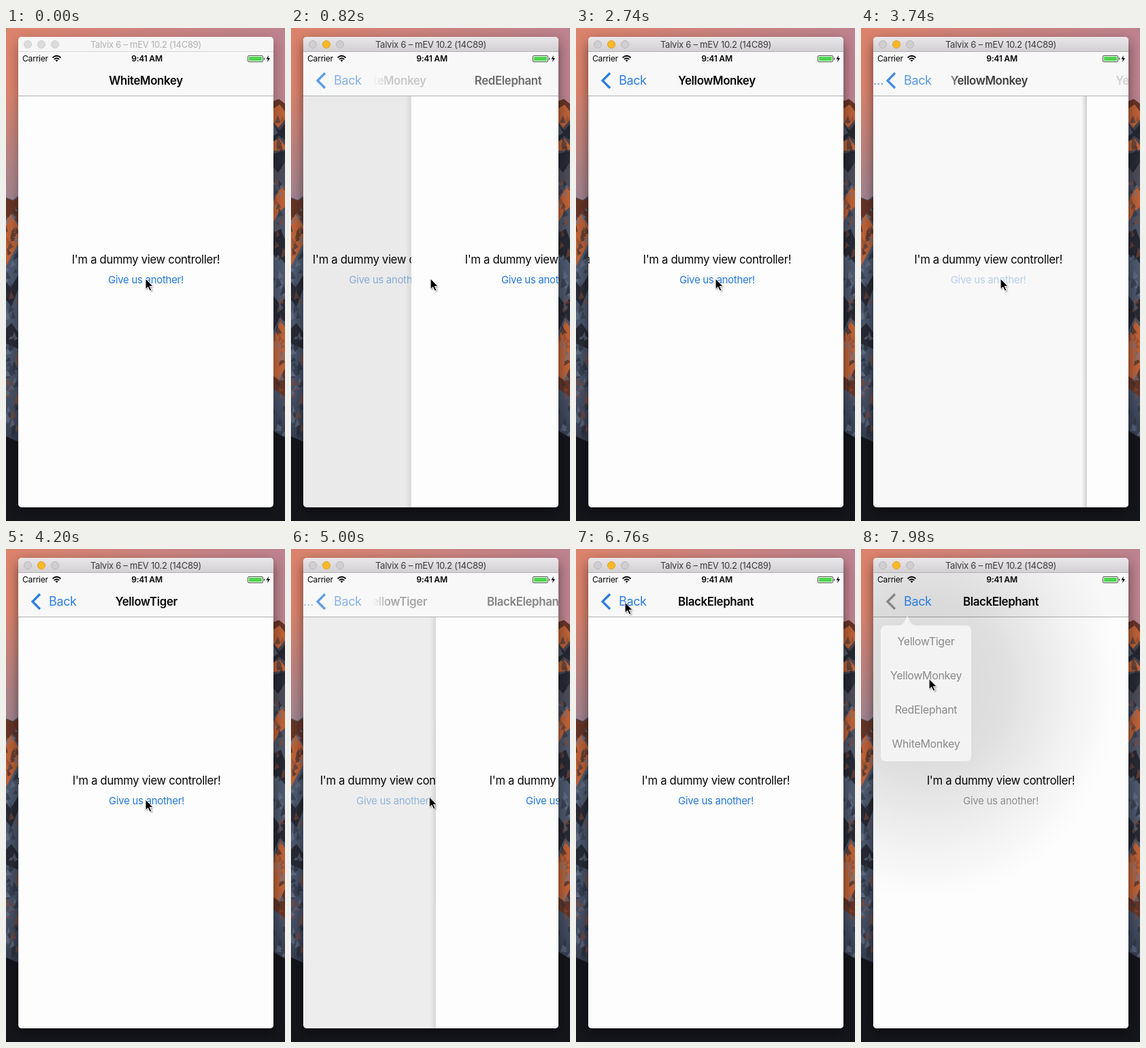
An HTML page that plays this animation: 410 by 722 pixels, repeating every 8 s.

```html
<!DOCTYPE html>
<html lang="en">
<head>
<meta charset="utf-8">
<title>Navigation demo</title>
<style>
html, body { margin: 0; width: 100%; height: 100%; overflow: hidden; background: #15161c; }
svg { display: block; width: 410px; height: 722px; }
text { font-family: Inter, "Open Sans", sans-serif; letter-spacing: -.02em; fill: #060606; }
.mid { text-anchor: middle; }
.label { font-size: 16.7px; }
.link { font-size: 15px; fill: #2479d8; }
.heading { font-size: 16.8px; font-weight: 600; }
.back { font-size: 18px; fill: #2b7de0; }
.status { font-size: 12.1px; }
.row { font-size: 16px; fill: #8a8a8a; }
</style>
</head>
<body>
<svg viewBox="0 0 410 722">
  <defs>
    <linearGradient id="sky">
      <stop stop-color="#dc836c"/><stop offset="1" stop-color="#bd838f"/>
    </linearGradient>
    <linearGradient id="haze" x2="0" y2="1">
      <stop offset=".35" stop-color="#94849a" stop-opacity="0"/><stop offset="1" stop-color="#94849a" stop-opacity=".85"/>
    </linearGradient>
    <linearGradient id="slope" x2="0" y2="1">
      <stop stop-color="#4a3d42"/><stop offset=".35" stop-color="#4f5b70"/><stop offset=".7" stop-color="#465168"/><stop offset="1" stop-color="#191b22"/>
    </linearGradient>
    <linearGradient id="chrome" x2="0" y2="1">
      <stop stop-color="#e9e7e9"/><stop offset="1" stop-color="#d1cfd1"/>
    </linearGradient>
    <linearGradient id="edge">
      <stop stop-opacity="0"/><stop offset="1" stop-opacity=".2"/>
    </linearGradient>
    <linearGradient id="fade" gradientUnits="userSpaceOnUse" x1="120" x2="144">
      <stop stop-color="#000"/><stop offset="1" stop-color="#fff"/>
    </linearGradient>
    <radialGradient id="glow">
      <stop stop-opacity=".15"/><stop offset=".4" stop-opacity=".12"/>
      <stop offset=".75" stop-opacity=".045"/><stop offset="1" stop-opacity="0"/>
    </radialGradient>
    <filter id="blur" x="-20%" y="-20%" width="140%" height="140%"><feGaussianBlur stdDeviation="9"/></filter>
    <filter id="soft" x="-50%" y="-50%" width="200%" height="200%"><feGaussianBlur stdDeviation="1"/></filter>
    <clipPath id="window"><rect x="18" y="13" width="375" height="689" rx="5"/></clipPath>
    <clipPath id="content"><rect x="18" y="100" width="375" height="602"/></clipPath>
    <clipPath id="oldClip"><rect id="oldArea" x="18" y="100" width="375" height="602"/></clipPath>
    <mask id="titleMask" maskUnits="userSpaceOnUse" x="0" y="36" width="410" height="63">
      <rect y="36" width="410" height="63" fill="url(#fade)"/>
    </mask>
  </defs>

  <!-- wallpaper -->
  <rect width="410" height="260" fill="url(#sky)"/>
  <rect width="410" height="260" fill="url(#haze)"/>
  <path d="M0 248L10 252 18 246H200L393 108 400 106 410 112V722H0z" fill="url(#slope)"/>
  <g fill="#bd6238">
    <path d="M0 282L7 272 18 290V316L9 332 0 349z"/>
    <path d="M393 112L402 108 410 122V134L400 146 393 138z"/>
    <path d="M393 166L402 162 410 172V178L393 180z"/>
    <path d="M393 254L401 238 410 232V262L401 270 393 284z"/>
    <path d="M393 456L403 428 410 438V498L401 516 393 510z"/>
  </g>
  <g fill="#653527">
    <path d="M0 249L10 253 18 249V286L9 270 0 282z"/>
    <path d="M393 107L401 104 410 111V122L402 112 393 118z"/>
    <path d="M393 510L402 516 410 498V540L393 528z"/>
  </g>
  <g fill="#272a35">
    <path d="M393 142L402 150 410 140V164L401 158 393 166z"/>
    <path d="M393 184L410 180V196L400 212 393 204z"/>
    <path d="M393 300L404 294 410 310V345L400 332 393 340z"/>
    <path d="M0 372L7 380 18 362V382L8 408 0 398z"/>
    <path d="M0 440L8 432 18 446V470L0 462z"/>
    <path d="M393 392L402 404 410 396V430L402 424 393 444z"/>
  </g>
  <g id="rocks" opacity=".55"></g>
  <path d="M0 598L18 606V690H393V590L410 600V722H0z" fill="#15161c"/>

  <!-- window -->
  <rect id="shadow" x="18" y="20" width="375" height="688" rx="6" filter="url(#blur)"/>
  <g clip-path="url(#window)">
    <rect x="18" y="13" width="375" height="689" fill="#fdfdfd"/>

    <g id="oldView" clip-path="url(#oldClip)">
      <g id="oldText">
        <text class="label mid" x="205.5" y="344.5">I'm a dummy view controller!</text>
        <text id="oldLink" class="link mid" x="205.5" y="374">Give us another!</text>
      </g>
      <rect id="dim" x="18" y="100" width="375" height="602"/>
      <rect id="edgeShade" y="100" width="8" height="602" fill="url(#edge)"/>
    </g>
    <g clip-path="url(#content)">
      <g id="newView">
        <rect x="18" y="100" width="375" height="602" fill="#fdfdfd"/>
        <text class="label mid" x="205.5" y="344.5">I'm a dummy view controller!</text>
        <text id="newLink" class="link mid" x="205.5" y="374">Give us another!</text>
      </g>
    </g>

    <rect x="18" y="35" width="375" height="64" fill="#f8f8f8"/>
    <rect x="18" y="99" width="375" height="1" fill="#b0b0b0"/>
    <ellipse id="halo" cx="95" cy="200" rx="285" ry="315" fill="url(#glow)"/>
    <g mask="url(#titleMask)"><text id="oldTitle" class="heading mid" y="83"></text></g>
    <text id="newTitle" class="heading mid" y="83"></text>
    <text id="dots" class="back" x="18" y="83">…</text>
    <path id="chevron" d="M50 66L39 77 50 88" fill="none" stroke-width="3.2"/>
    <text id="back" class="back" x="63" y="83">Back</text>

    <text class="status" x="24" y="49">Carrier</text>
    <text class="status mid" x="207" y="49" style="font-weight:600">9:41 AM</text>
    <g fill="none" stroke="#060606" stroke-width="1.8">
      <path d="M68.500 43.500Q74.500 38 80.500 43.500M70.800 45.900Q74.500 42.500 78.200 45.900"/>
    </g>
    <path d="M72.500 47.300Q74.500 45.600 76.500 47.300L74.500 49.500z"/>
    <rect x="355.500" y="40.500" width="22" height="9" rx="1.500" fill="#fdfdfd" stroke="#4a554a"/>
    <rect x="357" y="42" width="19" height="6" fill="#4fd64f"/>
    <path d="M379 43Q381 45 379 47z"/>
    <path d="M386 40L382.500 45.500H385L384 50 388 44H385.300z"/>

    <rect id="titleBar" x="18" y="13" width="375" height="22"/>
    <path id="barLine" d="M18 34.500H393"/>
    <g id="lights" stroke-width="1">
      <circle cx="32" cy="24" r="5.500"/><circle id="middle" cx="52" cy="24" r="5.500"/><circle cx="72" cy="24" r="5.500"/>
    </g>
    <path id="minus" d="M48.500 24H55.500" stroke="#8a5a00" stroke-width="1.500"/>
    <text id="caption" class="mid" x="205.500" y="28.700" font-size="13">Talvix 6 – mEV 10.2 (14C89)</text>

    <g id="popover">
      <path d="M37 112H57Q62 112 68 98 74 112 79 112H154Q162 112 162 120V303Q162 311 154 311H37Q29 311 29 303V120Q29 112 37 112z" fill="#f3f3f3"/>
      <g id="rows"></g>
    </g>
  </g>

  <g id="cursor">
    <path d="M1 2V17L5 13.500 8 19.500 10.500 18.500 8 12.500H12.500z" opacity=".4" filter="url(#soft)"/>
    <path d="M0 0V15.500L3.600 12.200 6.300 18 8.800 16.900 6.200 11.300H11z" stroke="#fff" stroke-width="1"/>
  </g>
</svg>
<script>
const LOOP = 8000;
const pages = ["WhiteMonkey", "RedElephant", "YellowMonkey", "YellowTiger", "BlackElephant"];
const pushes = [700, 2275, 3696, 4900];
const PRESS = 110, ACTIVATE = 560, POPOVER = 6850;
const CENTER = 205.5, WIDTH = 375;
// time, x, y of the pointer tip
const pointer = [
  [0, 205, 367], [4970, 205, 367], [5450, 50, 22], [5650, 50, 22],
  [6100, 72, 78], [7150, 72, 78], [7700, 100, 190], [8000, 100, 190]
];

const $ = id => document.getElementById(id);
const clamp = v => Math.max(0, Math.min(1, v));
const smooth = v => v * v * (3 - 2 * v);
const set = (id, attrs) => {
  for (const name in attrs) $(id).setAttribute(name, attrs[name]);
};
const show = (id, opacity) => set(id, { opacity: clamp(opacity) });

$("rows").innerHTML = pages.slice(0, 4).reverse()
  .map((name, i) => `<text class="row mid" x="95.5" y="${141 + i * 50}">${name}</text>`).join("");

// small random facets that roughen both mountain sides
function scatterRocks() {
  let seed = 7;
  const random = n => (seed = seed * 16807 % 2147483647) / 2147483647 * n;
  const tones = ["#20232d", "#2d323f", "#6f7a90", "#8a4a34"];
  let rocks = "";
  for (let i = 0; i < 150; i++) {
    const left = i % 2;
    const x = (left ? 0 : 393) + random(17), y = (left ? 262 : 122) + random(left ? 330 : 470);
    const tone = tones[Math.floor(random(tones.length))];
    rocks += `<path d="M${x} ${y}l${2 + random(5)} ${4 + random(9)} ${-4 - random(6)} ${random(6)}z" fill="${tone}"/>`;
  }
  $("rocks").innerHTML = rocks;
}
scatterRocks();

// critically damped spring
function spring(ms) {
  if (ms <= 0) return 0;
  if (ms > 600) return 1;
  const k = ms * .016;
  return 1 - (1 + k) * Math.exp(-k);
}

function pointerAt(t) {
  const i = Math.max(1, pointer.findIndex(p => t <= p[0]));
  const [t0, x0, y0] = pointer[i - 1], [t1, x1, y1] = pointer[i];
  const f = smooth((t - t0) / (t1 - t0));
  return [x0 + (x1 - x0) * f, y0 + (y1 - y0) * f];
}

function drawPush(t) {
  let step = 0;
  while (step < 3 && t >= pushes[step + 1] - PRESS) step++;
  const since = t - pushes[step], p = spring(since), q = 1 - p;
  const edge = 18 + WIDTH * q;

  set("oldArea", { width: WIDTH * q });
  set("oldText", { transform: `translate(${-WIDTH * .3 * p})` });
  set("newView", { transform: `translate(${WIDTH * q})` });
  show("dim", .13 * p);
  set("edgeShade", { x: edge - 8 });
  show("edgeShade", since > 0 ? q : 0);
  show("oldLink", since < -PRESS ? 1 : .2 + .8 * clamp(since / 320));

  $("oldTitle").textContent = pages[step];
  $("newTitle").textContent = pages[step + 1];
  set("oldTitle", { x: CENTER - 106 * p });
  set("newTitle", { x: CENTER + 252 * q + 7 * Math.sin(Math.PI * q) });
  show("oldTitle", 1 - 1.4 * p);
  show("newTitle", p);

  const back = step ? 1 - .45 * Math.sin(Math.PI * p) : p;
  show("back", back);
  show("chevron", Math.sqrt(back));
  show("dots", step && p > .1 ? .9 * q : 0);
}

function drawWindow(t) {
  const active = t >= ACTIVATE;
  set("titleBar", { fill: active ? "url(#chrome)" : "#f6f6f6" });
  set("barLine", { stroke: active ? "#b2b0b2" : "#d8d8d8" });
  set("lights", { fill: active ? "#d0ced0" : "#dcdcdc", stroke: active ? "#b8b6b8" : "#cecece" });
  set("middle", { fill: active ? "#fdb924" : "#dcdcdc", stroke: active ? "#dc9e2a" : "#cecece" });
  $("caption").style.fill = active ? "#3c3a3c" : "#b0b0b0";
  show("shadow", active ? .5 : .32);
}

function draw(t) {
  drawWindow(t);
  drawPush(t);

  const menu = smooth(clamp((t - POPOVER) / 250));
  show("popover", menu);
  show("halo", menu);
  $("newLink").style.fill = menu > .5 ? "#999" : "";
  set("chevron", { stroke: menu > .5 ? "#858585" : "#2b7de0" });

  const [x, y] = pointerAt(t);
  set("cursor", { transform: `translate(${x} ${y})` });
  show("minus", x < 82 && y < 33 ? 1 : 0);
}

const start = performance.now();
function tick() {
  draw(Math.max(0, performance.now() - start) % LOOP);
  requestAnimationFrame(tick);
}
tick();
</script>
</body>
</html>
```
